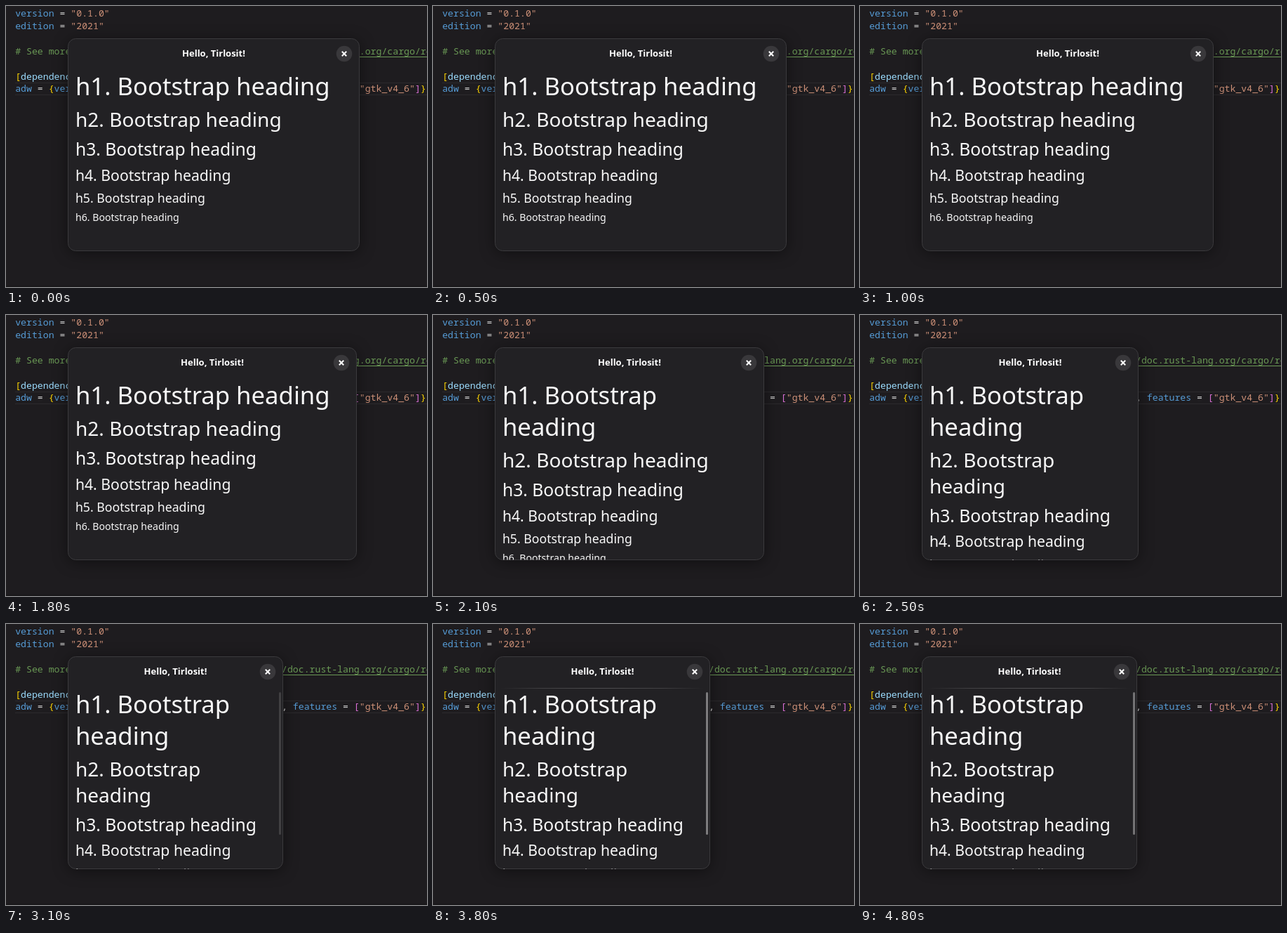
These frames come from a looping animation (600 by 400 pixels, 5100 ms). An HTML page with a canvas:

```html
<!DOCTYPE html>
<html lang="en">
<head>
<meta charset="utf-8">
<title>Resizing headings</title>
<style>
  html, body { margin: 0; width: 600px; height: 400px; overflow: hidden; background: #1e1c1f; }
  canvas { display: block; }
</style>
</head>
<body>
<canvas id="stage" width="600" height="400"></canvas>
<script>
const ctx = document.getElementById('stage').getContext('2d');
const LOOP = 5100, TICK = 100;
const LEFT = 88, TOP = 46.5, BOTTOM = 348.5, TEXT_X = 98.9;

const KEY = '#569cd6', STR = '#ce9178', NOTE = '#6a9955', PLAIN = '#d4d4d4';
const GOLD = '#ffd700', PINK = '#da70d6', NAME = '#9cdcfe';
const CODE = [
  [15, ['version', KEY], [' = ', PLAIN], ['"0.1.0"', STR]],
  [33, ['edition', KEY], [' = ', PLAIN], ['"2021"', STR]],
  [69, ['# See more keys and their definitions at ', NOTE],
       ['https://doc.rust-lang.org/cargo/reference/manifest.html', NOTE, true]],
  [105, ['[', GOLD], ['dependencies', NAME], [']', GOLD]],
  [122, ['adw', KEY], [' = ', PLAIN], ['{', GOLD], ['version', KEY], [' = ', PLAIN],
       ['"0.1.1"', STR], [', ', PLAIN], ['package', KEY], [' = ', PLAIN],
       ['"libadwaita"', STR], [', ', PLAIN], ['features', KEY], [' = ', PLAIN],
       ['[', PINK], ['"gtk_v4_6"', STR], [']', PINK], ['}', GOLD]]
];

// font size and unwrapped baseline of each heading level
const HEADINGS = [[34.7, 127], [28.1, 172], [24.7, 213], [21.2, 248.5], [17.7, 280], [14.15, 306]];

// right edge of the window for each tick of the drag
const DRAG_START = 1700;
const EDGES = [503, 499, 491, 482, 471, 466, 458, 425, 396, 394];

// moments at which the scrollbar opacity changes
const BAR = [[3100, .14], [3200, .27], [3300, .38], [3500, .41], [4600, .39], [4800, .37]];

function rightEdge(t) {
  const step = Math.floor((t - DRAG_START) / TICK);
  return EDGES[Math.max(0, Math.min(EDGES.length - 1, step))];
}

function drawEditor() {
  ctx.fillStyle = '#1e1c1f';
  ctx.fillRect(0, 0, 600, 400);
  ctx.fillStyle = '#2c2a2d';
  ctx.fillRect(13, 109, 587, 1);
  ctx.fillRect(13, 126, 587, 1);
  ctx.fillStyle = '#19181a';
  ctx.fillRect(0, 398, 600, 2);
  ctx.font = '13.2px "Noto Sans Mono", monospace';
  for (const [y, ...tokens] of CODE) {
    let x = 13.2;
    for (const [text, color, underlined] of tokens) {
      const width = ctx.measureText(text).width;
      ctx.fillStyle = color;
      ctx.fillText(text, x, y);
      if (underlined) ctx.fillRect(x, y + 3, width, 1);
      x += width;
    }
  }
}

function windowPath(right) {
  ctx.beginPath();
  ctx.roundRect(LEFT + .5, TOP, right - LEFT, BOTTOM - TOP, 11);
}

function drawFrame(right) {
  ctx.save();
  ctx.shadowColor = 'rgba(0,0,0,.45)';
  ctx.shadowBlur = 22;
  ctx.shadowOffsetY = 3;
  ctx.fillStyle = '#222124';
  windowPath(right);
  ctx.fill();
  ctx.restore();
  ctx.strokeStyle = '#3b3a3d';
  ctx.lineWidth = 1;
  ctx.stroke();
}

function drawHeader(right) {
  ctx.fillStyle = '#fff';
  ctx.font = 'bold 13px "Noto Sans", sans-serif';
  ctx.textAlign = 'center';
  ctx.fillText('Hello, Tirlosit!', (LEFT + right) / 2 + .5, 72);
  ctx.textAlign = 'left';

  const x = right - 21, y = 68, r = 3.2;
  ctx.fillStyle = '#39383b';
  ctx.beginPath();
  ctx.arc(x, y, 11.3, 0, 2 * Math.PI);
  ctx.fill();
  ctx.strokeStyle = '#fff';
  ctx.lineWidth = 2;
  ctx.beginPath();
  ctx.moveTo(x - r, y - r);
  ctx.lineTo(x + r, y + r);
  ctx.moveTo(x + r, y - r);
  ctx.lineTo(x - r, y + r);
  ctx.stroke();
}

function drawHeadings(right) {
  ctx.save();
  windowPath(right);
  ctx.clip();
  ctx.fillStyle = '#f8f8f8';
  let shift = 0;
  HEADINGS.forEach(([size, baseline], i) => {
    const start = `h${i + 1}. Bootstrap`, full = start + ' heading';
    ctx.font = `${size}px "Noto Sans", sans-serif`;
    const wraps = TEXT_X + ctx.measureText(full).width > right - 10;
    ctx.fillText(wraps ? start : full, TEXT_X, baseline + shift);
    if (wraps) {
      shift += size * 1.3;
      ctx.fillText('heading', TEXT_X, baseline + shift);
    }
  });
  ctx.restore();
}

function drawScrollHints(t, right) {
  const alpha = BAR.reduce((now, [start, value]) => t >= start ? value : now, 0);
  ctx.fillStyle = `rgba(255,255,255,${alpha})`;
  ctx.beginPath();
  ctx.roundRect(right - 5, 97, 3, 203, 1.5);
  ctx.fill();

  if (t < 3800) return;
  const line = ctx.createLinearGradient(LEFT + 8, 0, right - 8, 0);
  line.addColorStop(0, 'rgba(255,255,255,0)');
  line.addColorStop(.2, 'rgba(255,255,255,.14)');
  line.addColorStop(.5, 'rgba(255,255,255,.2)');
  line.addColorStop(.8, 'rgba(255,255,255,.14)');
  line.addColorStop(1, 'rgba(255,255,255,0)');
  ctx.fillStyle = line;
  ctx.fillRect(LEFT + 8, 91, right - LEFT - 16, 1);
}

function draw(now) {
  const t = now % LOOP, right = rightEdge(t);
  drawEditor();
  drawFrame(right);
  drawHeader(right);
  drawHeadings(right);
  drawScrollHints(t, right);
  requestAnimationFrame(draw);
}
requestAnimationFrame(draw);
</script>
</body>
</html>
```
